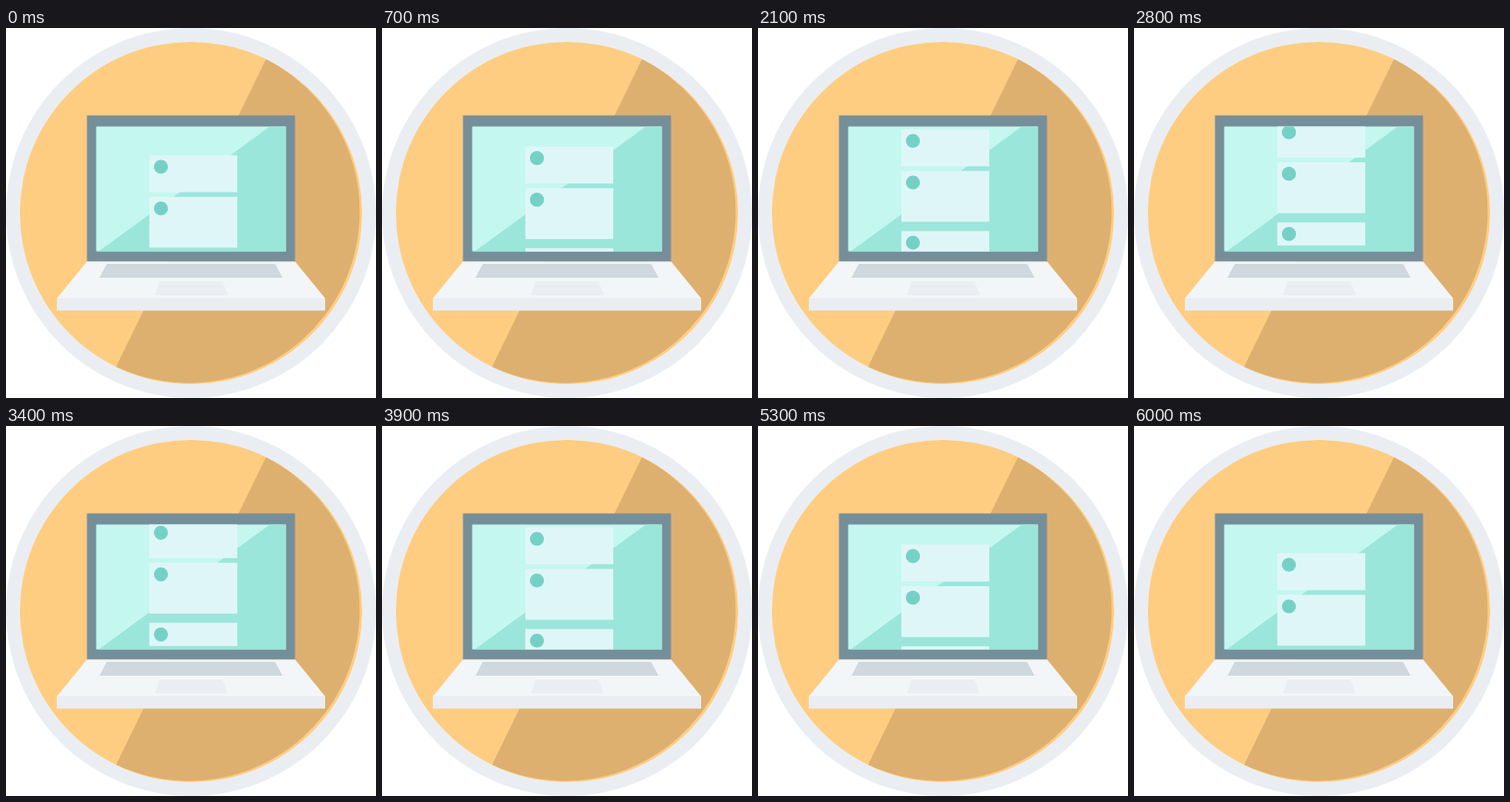
Write an HTML page that moves like this. It is 400 by 400 pixels and loops after 6.1 s.

```html
<!DOCTYPE html>
<html lang="en">
<head>
<meta charset="utf-8">
<title>Laptop scrolling</title>
<style>
  html, body { margin: 0; width: 100%; height: 100%; overflow: hidden; background: #fff; }
  svg { display: block; width: 100vw; height: 100vh; }
</style>
</head>
<body>
<svg viewBox="0 0 400 400">
  <defs>
    <clipPath id="screen"><rect x="97.5" y="106.5" width="205" height="135"/></clipPath>
  </defs>

  <circle cx="200" cy="200" r="200" fill="#eaeef2"/>
  <circle cx="200" cy="200" r="185" fill="#ffcd81"/>
  <path d="M281 33.7A185 185 0 0 1 119 366.3Z" fill="#deb06f"/>

  <rect x="87.5" y="94.5" width="225" height="158" fill="#758f9a"/>
  <g clip-path="url(#screen)">
    <rect x="97" y="106" width="206" height="136" fill="#c3f7ef"/>
    <path d="M286 106H303V242H99.5Z" fill="#9be6da"/>
    <g id="cards"></g>
  </g>

  <path d="M87.5 252.5H312.5L345 292.3H55Z" fill="#f2f6f9"/>
  <rect x="55" y="292" width="290" height="13.5" fill="#eaeef2"/>
  <path d="M109 255H291L299 270H101Z" fill="#cfd8dc"/>
  <path d="M166 274H234L240 289H161Z" fill="#eaeef2"/>
</svg>
<script>
  const LOOP = 6100, STEP = 100, TURN = 3000, TRAVEL = 40;
  const cards = document.getElementById('cards');

  const card = (y, h) =>
    `<rect x="155" y="${y}" width="95" height="${h}" fill="#dff6f8"/>` +
    `<circle cx="167.5" cy="${y + 12.5}" r="7.6" fill="#75d1c5"/>`;

  cards.innerHTML = card(137.5, 40) + card(182.5, 55) + card(247.5, 25);

  // Scrolls up at constant speed, then back down, in 100 ms steps.
  function draw(ms) {
    const t = Math.floor((ms % LOOP) / STEP) * STEP;
    const shift = TRAVEL * (1 - Math.abs(t - TURN) / TURN);
    cards.setAttribute('transform', `translate(0 ${-shift})`);
  }

  const start = performance.now();
  function tick() {
    draw(performance.now() - start);
    requestAnimationFrame(tick);
  }
  tick();
</script>
</body>
</html>
```
